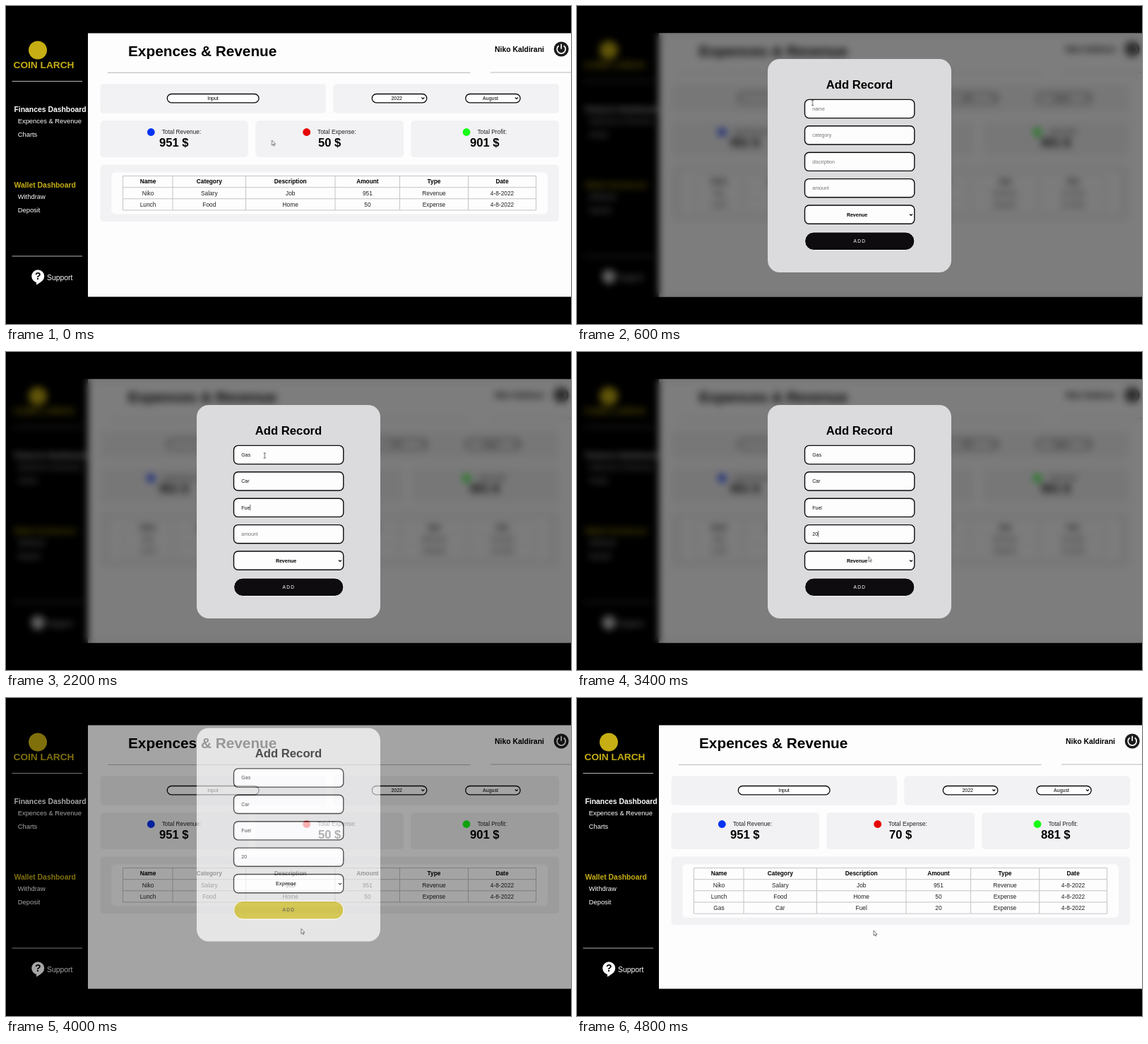
An HTML page for the animation above (4.9 s loop, 800 by 450 pixels).

```html
<!DOCTYPE html>
<html lang="en">
<head>
<meta charset="utf-8">
<title>Expences &amp; Revenue</title>
<style>
html, body { margin: 0; width: 100%; height: 100%; overflow: hidden; background: #000; }
#stage { position: relative; width: 800px; height: 450px; overflow: hidden; background: #000; }
#stage > * { position: absolute; left: 0; top: 0; }
svg { display: block; font-family: "Liberation Sans", Arial, sans-serif; }
.b { font-weight: 700; }
.m { text-anchor: middle; }
.head { font-size: 10.4px; font-weight: 700; }
.link { font-size: 9.4px; }
.cell { font-size: 8.33px; }
.num { font-size: 16.6px; font-weight: 700; }
.small { font-size: 7px; }
.gold { fill: #c6ae14; }
.panel { fill: #f2f1f3; }
.pill { fill: #fefdfe; stroke: #0a0a0a; stroke-width: 1.3; }
.hint { fill: #757575; }
.line { fill: none; stroke: #c4c3c5; }
.chev { fill: none; stroke: #111; stroke-width: 1.2; }
#blur { top: 38px !important; width: 800px; height: 373.5px; backdrop-filter: blur(5.5px); }
#modal { width: 800px; height: 450px; opacity: 0; animation: fade 4.9s infinite; }
#shade { position: absolute; top: 38px; width: 800px; height: 373.5px; background: rgba(0, 0, 0, .505); }
#card { position: absolute; transform: translateY(-108px); animation: drop 4.9s infinite; }
#pointer { animation: move 4.9s infinite ease-in-out; }
.grow { height: var(--h); animation: grow 4.9s infinite step-end; }
@keyframes fade {
  0%, 4.08% { opacity: 0; }
  12.1%, 80% { opacity: 1; }
  88.16%, 100% { opacity: 0; }
}
@keyframes drop {
  0%, 4.08% { transform: translateY(-108px); }
  12.1%, 80% { transform: none; }
  88.16%, 100% { transform: translateY(-108px); }
}
@keyframes grow {
  0% { height: var(--h); }
  85.71%, 100% { height: calc(var(--h) + 16.2px); }
}
@keyframes move {
  0% { transform: translate(376.5px, 190px); }
  4.08%, 8.16% { transform: translate(300px, 130px); }
  12.24% { transform: translate(333.5px, 137px); }
  18.4%, 61.2% { transform: translate(366.3px, 146.5px); }
  67.3%, 70.4% { transform: translate(412.7px, 289.5px); }
  75.5%, 83.3% { transform: translate(418px, 326.5px); }
  87.3%, 100% { transform: translate(420px, 329px); }
}
</style>
</head>
<body>
<div id="stage">
  <svg id="page" width="800" height="450">
    <rect x="116" y="38.5" width="684" height="373" fill="#fefdfe"/>

    <circle class="gold" cx="45" cy="62.5" r="13"/>
    <text class="gold b m" x="53.5" y="87.6" font-size="13.7">COIN LARCH</text>
    <path d="M8.500 106.500H108M8.500 354H108" stroke="#b5b5b5"/>
    <g fill="#fff">
      <text class="head" x="11.5" y="150">Finances Dashboard</text>
      <text class="link" x="16.700" y="166">Expences &amp; Revenue</text>
      <text class="link" x="16.700" y="185">Charts</text>
      <text class="link" x="16.700" y="273.300">Withdraw</text>
      <text class="link" x="16.700" y="292">Deposit</text>
      <text x="58" y="387.600" font-size="10.4">Support</text>
      <circle cx="45.200" cy="382.300" r="9"/>
      <path d="M43 389v5.500q6-2.500 9-7.500z"/>
    </g>
    <text class="b m" x="45.200" y="387.300" font-size="14">?</text>
    <text class="head gold" x="11.500" y="257">Wallet Dashboard</text>

    <text class="b" x="173" y="71.300" font-size="20.8">Expences &amp; Revenue</text>
    <text class="head" x="692" y="64.800">Niko Kaldirani</text>
    <path d="M144 94.500H657.500M686 94H800" stroke="#b9b8ba"/>
    <circle cx="786.200" cy="61" r="10.500" fill="#1c1c1c"/>
    <path d="M782.700 56.300a6 6 0 1 0 7 0M786.200 53.800v7" fill="none" stroke="#fefdfe" stroke-width="1.7"/>

    <g class="panel">
      <rect x="133.500" y="110.300" width="319.500" height="41.500" rx="5"/>
      <rect x="463.300" y="110.300" width="319.700" height="41.500" rx="5"/>
      <rect x="133.500" y="162.300" width="209.500" height="51.700" rx="5"/>
      <rect x="353.300" y="162.300" width="209.700" height="51.700" rx="5"/>
      <rect x="573.300" y="162.300" width="209.700" height="51.700" rx="5"/>
      <rect class="grow" style="--h:80.500px" x="133.500" y="224.600" width="649.500" rx="5"/>
    </g>
    <rect class="grow" style="--h:59.300px" x="149.300" y="235.200" width="617.700" rx="6" fill="#fefdfe"/>

    <g class="small m">
      <rect class="pill" x="228.300" y="124.500" width="129.700" height="12.300" rx="6.100"/>
      <text x="293" y="133.200">Input</text>
      <rect class="pill" x="518.300" y="124.500" width="77.500" height="12.300" rx="6.100"/>
      <text x="553.200" y="133.200">2022</text>
      <rect class="pill" x="650.800" y="124.500" width="77.300" height="12.300" rx="6.100"/>
      <text x="686" y="133.200">August</text>
      <path class="chev" d="M588.300 129.500l2 2 2-2M720.900 129.500l2 2 2-2"/>
    </g>

    <circle cx="205.300" cy="178.500" r="5.400" fill="#0433f5"/>
    <circle cx="425.700" cy="178.500" r="5.400" fill="#e60404"/>
    <circle cx="652" cy="178.500" r="5.400" fill="#16fb16"/>
    <g class="cell" fill="#222">
      <text x="220.700" y="181.300">Total Revenue:</text>
      <text x="441" y="181.300">Total Expense:</text>
      <text x="667.400" y="181.300">Total Profit:</text>
    </g>
    <text class="num" x="217" y="198.900">951 $</text>
    <g id="table" class="cell m"></g>
  </svg>

  <div id="blur"></div>

  <div id="modal">
    <div id="shade"></div>
    <svg id="card" width="800" height="450">
      <rect x="270" y="75" width="260" height="302" rx="17" fill="#dbdadc"/>
      <text class="b m" x="400" y="116.700" font-size="16.7">Add Record</text>
      <g id="form" class="small"></g>
      <path class="chev" d="M471 294.500l2 2 2-2"/>
      <rect x="322.600" y="320" width="155.300" height="25.500" rx="12.700" fill="#0e0c0e" stroke="#fdfcfd"/>
    </svg>
  </div>

  <svg width="800" height="450">
    <g id="pointer"></g>
  </svg>
</div>

<script>
const LOOP = 4900;
const ADDED = 4200;
const $ = id => document.getElementById(id);

function add(parent, tag, attrs, text = "") {
  const el = document.createElementNS("http://www.w3.org/2000/svg", tag);
  for (const k in attrs) el.setAttribute(k, attrs[k]);
  el.textContent = text;
  return parent.appendChild(el);
}

// Makes an element visible from one time to another in each loop.
function show(el, from, to = LOOP) {
  const key = (visibility, t) => ({ visibility, offset: t / LOOP, easing: "step-end" });
  el.animate(
    [key("hidden", 0), key("visible", from), key("hidden", to), key("hidden", LOOP)],
    { duration: LOOP, iterations: Infinity }
  );
}

// Table and totals
const table = $("table");
const mids = [201, 287.8, 402.7, 511.9, 606, 702.5];
const cols = [165.5, 236, 339.5, 466, 557.5, 654.5, 750.5];
const lineY = i => 240.5 + i * 16.15;

function row(parent, i, cells, cls = "") {
  const top = lineY(i), bottom = lineY(i + 1);
  const sides = cols.map(x => `M${x} ${top}V${bottom}`).join("");
  add(parent, "path", { class: "line", d: `${sides}M165.500 ${bottom}H750.500` });
  cells.split(",").forEach((s, c) =>
    add(parent, "text", { x: mids[c], y: top + 10.9, class: cls, fill: cls ? "#000" : "#222" }, s));
}

add(table, "path", { class: "line", d: "M165.500 240.500H750.500" });
row(table, 0, "Name,Category,Description,Amount,Type,Date", "b");
row(table, 1, "Niko,Salary,Job,951,Revenue,4-8-2022");
row(table, 2, "Lunch,Food,Home,50,Expense,4-8-2022");
const fresh = add(table, "g", {});
row(fresh, 3, "Gas,Car,Fuel,20,Expense,4-8-2022");
show(fresh, ADDED);

function total(x, before, after) {
  const at = { class: "num", x, y: 198.9, style: "text-anchor:start" };
  show(add($("page"), "text", at, before), 0, ADDED);
  show(add($("page"), "text", at, after), ADDED);
}
total(442, "50 $", "70 $");
total(657, "901 $", "881 $");

// Form: each field has a focus time, key times and a blur time
const form = $("form");
const fieldY = i => 132.4 + i * 37.4;
const box = i => add(form, "rect", {
  x: 322.5, y: fieldY(i), width: 155.3, height: 26.2, rx: 6,
  fill: "#fefdfe", stroke: "#0a0a0a", "stroke-width": 1.4
});

function field(i, hint, value, focus, keys, blur) {
  const y = fieldY(i) + 15.3;
  box(i);
  show(add(form, "text", { class: "hint", x: 333.3, y }, hint), 0, keys[0]);
  [focus, ...keys].forEach((t, n) => {
    const next = n < keys.length ? keys[n] : LOOP;
    const text = add(form, "text", { x: 333.3, y, fill: "#111" }, value.slice(0, n));
    const x = 333.8 + (n ? text.getComputedTextLength() : 0);
    const caret = add(form, "path", { d: `M${x} ${y - 6.7}v8.500`, stroke: "#000", "stroke-width": .6 });
    show(text, t, next);
    show(caret, t, Math.min(next, blur));
  });
}
field(0, "name", "Gas", 700, [1000, 1100, 1300], 1400);
field(1, "category", "Car", 1400, [1500, 1700, 1800], 1900);
field(2, "discription", "Fuel", 1900, [2000, 2100, 2200, 2300], 2400);
field(3, "amount", "20", 2400, [2600, 2800], 3500);

box(4);
const pick = s => add(form, "text", { class: "b m", x: 396.5, y: 297.9 }, s);
show(pick("Revenue"), 0, 3700);
show(pick("Expense"), 3700);

// Button and its hover look
const card = $("card");
const label = fill => add(card, "text", {
  class: "m", x: 400.5, y: 335, "font-size": 6.6, "letter-spacing": 1.3, fill
}, "ADD");
show(label("#fff"), 0, 3800);
show(add(card, "rect", {
  x: 322.6, y: 320, width: 155.3, height: 25.5, rx: 12.7, fill: "#c3b10e", stroke: "#fdfcfd"
}), 3800);
show(label("#111"), 3800);

show($("blur"), 590, 3920);

// Pointer shapes
const pointer = $("pointer");
const arrow = () => add(pointer, "path", {
  d: "M0 0V7.200L1.700 5.700 2.800 8 3.800 7.500 2.800 5.300H5z",
  fill: "#fff", stroke: "#222", "stroke-width": .6
});
show(arrow(), 0, 500);
show(add(pointer, "path", {
  d: "M-1.500 -3.500H1.500M0 -3.500V3.500M-1.500 3.500H1.500", stroke: "#222", "stroke-width": .7
}), 500, 3050);
show(arrow(), 3050);
</script>
</body>
</html>
```
